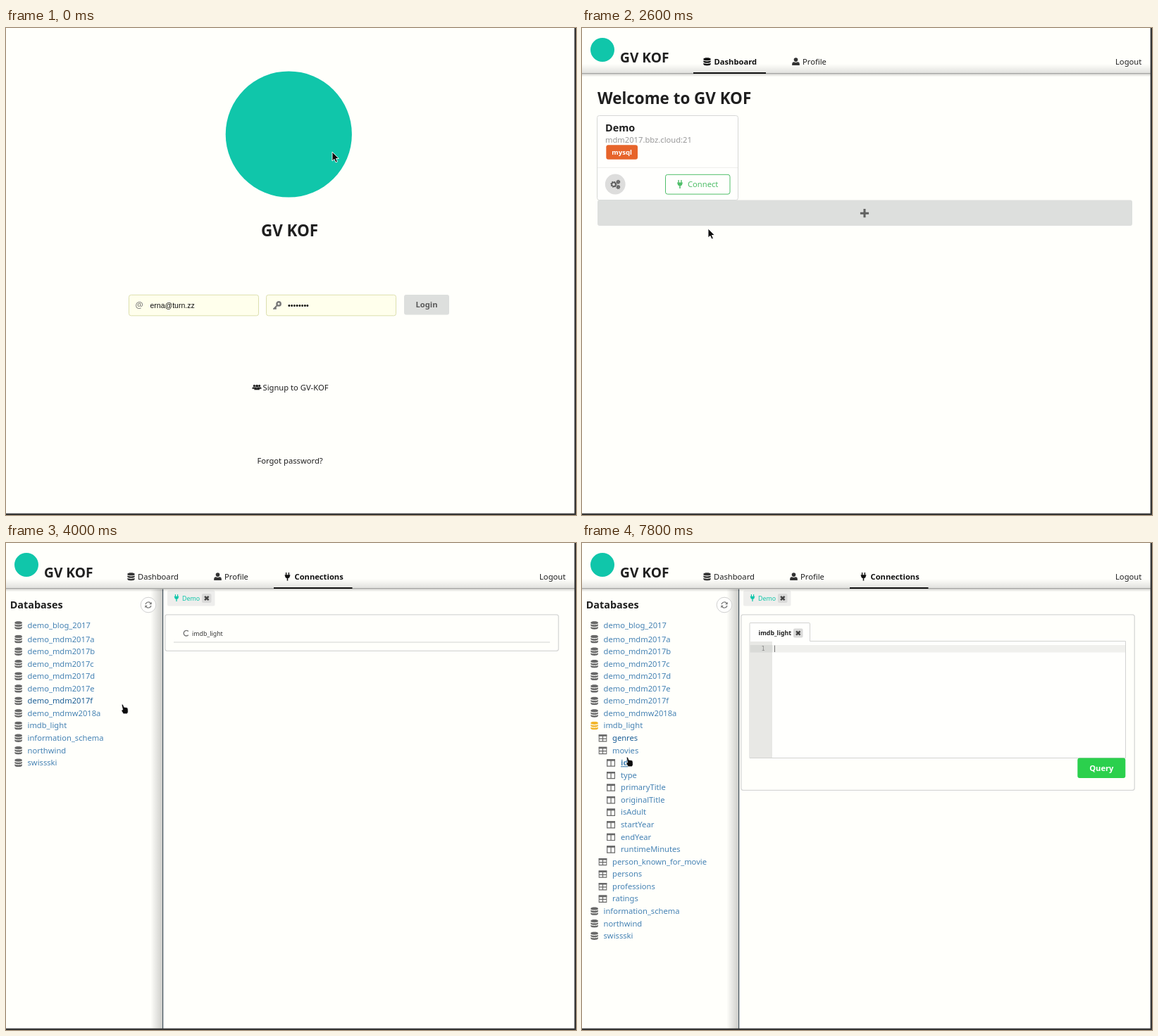
An HTML page that plays this animation: 809 by 692 pixels, repeating every 8 s.

```html
<!DOCTYPE html>
<html lang="en">
<head>
<meta charset="utf-8">
<title>Database client</title>
<style>
html, body { margin: 0; width: 100%; height: 100%; overflow: hidden; background: #fffffb; }
svg { display: block; width: 100vw; height: 100vh; }
text { font: 11.2px "Noto Sans", "Open Sans", sans-serif; fill: #1f1f1f; white-space: pre; }
.b { font-weight: 700; }
.link text { fill: #4683b4; }
.link.hover text { fill: #1c5f96; }
</style>
</head>
<body>
<svg id="stage" viewBox="0 0 809 692" xmlns="http://www.w3.org/2000/svg"></svg>
<script>
const LOOP = 8000, STEP = 100, PITCH = 17.57;
const stage = document.getElementById('stage');
const TEAL = '#10c6aa', GREY = '#dddfdd', EDGE = '#d6d7d6';

const text = (x, y, s, { size = 11.2, fill, bold, more = '' } = {}) =>
  `<text x="${x}" y="${y}" class="${bold ? 'b' : ''}" style="font-size:${size}px${fill ? ';fill:' + fill : ''}" ${more}>${s}</text>`;
const mid = 'text-anchor="middle"';
const rect = (x, y, w, h, fill, more = '') =>
  `<rect x="${x}" y="${y}" width="${w}" height="${h}" fill="${fill}" ${more}/>`;
const icon = (name, x, y, w, color) =>
  `<use href="#${name}" x="${x}" y="${y}" width="${w}" height="${w}" color="${color}"/>`;
const group = (id, body, more = '') => `<g id="${id}" ${more}>${body}</g>`;
const symbol = (id, body) => `<symbol id="${id}" viewBox="0 0 14 14">${body}</symbol>`;
const fillPath = d => `<path fill="currentColor" d="${d}"/>`;
const linePath = (d, w) => `<path fill="none" stroke="currentColor" stroke-width="${w}" d="${d}"/>`;
const person = (x, y, s) => `<g transform="translate(${x} ${y}) scale(${s})">` +
  fillPath('M7 .5a3.2 3.2 0 0 1 0 6.6a3.2 3.2 0 0 1 0-6.6ZM.8 13V11Q.8 7.8 4 7.6Q7 9 10 7.6Q13.2 7.8 13.2 11V13Z') + '</g>';

const defs = `<defs>
  ${symbol('db', fillPath('M1 2.6C1-.3 13-.3 13 2.6V3.3C13 5.9 1 5.9 1 3.3ZM1 5.2C3 7 11 7 13 5.2V7.3C13 10 1 10 1 7.3ZM1 9.3C3 11.1 11 11.1 13 9.3V11.4C13 14.3 1 14.3 1 11.4Z'))}
  ${symbol('user', person(0, 0, 1))}
  ${symbol('users', person(0, 2.6, .48) + person(7.3, 2.6, .48) + person(2.9, 2.5, .6))}
  ${symbol('plug', fillPath('M4 0H5.6V4H8.4V0H10V4H11.5V5.5H11Q11 9.2 7.9 9.7V14H6.1V9.7Q3 9.2 3 5.5H2.5V4H4Z'))}
  ${symbol('plus', fillPath('M5.3 0H8.7V5.3H14V8.7H8.7V14H5.3V8.7H0V5.3H5.3Z'))}
  ${symbol('cross', linePath('M3 3L11 11M11 3L3 11', 3.6))}
  ${symbol('key', '<circle cx="9.4" cy="4.6" r="3.1" fill="none" stroke="currentColor" stroke-width="2.8"/>' + linePath('M7 7L1.5 12.5H4.5V10.5', 2.2))}
  ${symbol('table', linePath('M.8 2H13.2V12.5H.8ZM7 3V12M1 8H13', 1.4) + fillPath('M.2 1.3H13.8V4.2H.2Z'))}
  ${symbol('column', linePath('M.8 2H13.2V12.5H.8ZM7 3V12', 1.4) + fillPath('M.2 1.3H13.8V4.2H.2Z'))}
  ${symbol('refresh', linePath('M2 6A5.2 5.2 0 0 1 11.5 4.3M12 8A5.2 5.2 0 0 1 2.5 9.7', 1.5) + fillPath('M13 1.5V6H8.5ZM1 12.5V8H5.5Z'))}
  ${symbol('gears', [[4.8, 7, 2.7], [11, 3.6, 1.4], [11, 10.6, 1.4]].map(([x, y, r]) =>
    `<circle cx="${x}" cy="${y}" r="${r}" fill="none" stroke="currentColor" stroke-width="1.7"/>
     <circle cx="${x}" cy="${y}" r="${r + 1}" fill="none" stroke="currentColor" stroke-width="1.4" stroke-dasharray="${(r + 1) * Math.PI / 8}"/>`).join(''))}
  <linearGradient id="headShade" x2="0" y2="1"><stop stop-opacity="0"/><stop offset="1" stop-opacity=".12"/></linearGradient>
  <linearGradient id="underShade" x2="0" y2="1"><stop stop-opacity=".16"/><stop offset="1" stop-opacity="0"/></linearGradient>
  <linearGradient id="sideShade"><stop stop-opacity="0"/><stop offset="1" stop-opacity=".2"/></linearGradient>
</defs>`;

const login =
  `<circle cx="401.3" cy="151" r="89.6" fill="${TEAL}"/>` +
  text(402.5, 295.5, 'GV KOF', { size: 22.4, bold: 1, more: mid }) +
  [174.5, 369.5].map(x => rect(x, 379.3, 184, 29.5, '#ffffec', 'rx="3" stroke="#dcdfae"')).join('') +
  text(183.5, 398, '@', { size: 12.5, fill: '#777' }) +
  text(204.5, 398, 'erna@turn.zz', { size: 10.5, more: 'font-family="Liberation Sans"' }).replace('style="', 'style="font-family:\'Liberation Sans\',sans-serif;fill:#111;') +
  icon('key', 379, 388, 12, '#777') +
  text(400, 398, '•'.repeat(8), { fill: '#111' }).replace('font-size:11.2px', "font:10.67px 'Liberation Sans',sans-serif") +
  rect(565, 379, 64, 28.6, GREY, 'id="loginBox" rx="3"') +
  group('loginLabel', text(597, 397, 'Login', { bold: 1, fill: '#5a5a5a', more: mid })) +
  group('loginSpin', '<circle cx="597" cy="393.3" r="6.5" fill="none" stroke="#aaa" stroke-width="2"/><path d="M590.5 393.3A6.5 6.5 0 0 1 597 386.8" fill="none" stroke="#666" stroke-width="2"/>') +
  icon('users', 349, 504, 14, '#222') + text(364.5, 515, 'Signup to GV-KOF') +
  text(403, 619, 'Forgot password?', { more: mid });

const tab = (name, x, label, bold) =>
  icon(name, x, 41.8, 12, bold ? '#111' : '#333') + text(x + (bold ? 16 : 15.5), 52, label, { bold, fill: bold ? '#111' : '' });
const underline = (x, w) => rect(x, 63, w, 2, '#111');
const header =
  rect(0, 51, 807, 13.5, 'url(#headShade)') + rect(0, 64, 807, 1.2, '#a3a4a2') +
  rect(0, 65.2, 807, 4, 'url(#underShade)') +
  `<circle cx="29" cy="31" r="17" fill="${TEAL}"/>` +
  text(54, 49, 'GV KOF', { size: 19.2, bold: 1 }) + text(757, 52, 'Logout') +
  group('navHome', tab('db', 171.5, 'Dashboard', 1) + tab('user', 297.5, 'Profile') + underline(158, 103)) +
  group('navPlain', tab('db', 171.5, 'Dashboard') + tab('user', 294.5, 'Profile')) +
  group('navConn', tab('plug', 393.5, 'Connections', 1) + underline(380, 111.5));

const card =
  rect(21.5, 124.5, 200, 120, '#fffffd', `rx="3" stroke="${EDGE}"`) +
  text(33, 147, 'Demo', { size: 14.4, bold: 1 }) +
  text(33, 163, 'mdm2017.bbz.cloud:21', { fill: '#999' }) +
  rect(34.3, 166.3, 44.7, 20.4, '#e7642b', 'rx="3"') +
  text(56.7, 180, 'mysql', { size: 9.6, bold: 1, fill: '#fff', more: mid }) +
  rect(22, 198, 199, 1, '#efefed') +
  '<circle cx="47.2" cy="222" r="14.4" fill="#dddddc"/>' + icon('gears', 40, 215, 14.5, '#5c5c5c') +
  rect(118.5, 208.3, 91.5, 27.8, '#fffffd', 'id="connectBox" rx="3"') +
  group('connectLabel', icon('plug', 133, 216, 12, 'currentColor') + text(150, 226, 'Connect', { fill: 'currentColor' }));
const home =
  text(22, 108, 'Welcome to GV KOF', { size: 22.4, bold: 1 }) + group('card', card) +
  group('add', rect(22, 124.5, 759, 36.5, GREY, 'id="addBox" rx="3"') + icon('plus', 394.7, 137, 12.6, '#606160'));

const row = (i, label, level = 0, name = 'db') => {
  const y = i ? 136.5 + PITCH * (i - 1) : 116.8;
  const x = [30.5, 43, 55][level];
  const key = label === 'id';
  return `<g class="link" data-y="${y}">` +
    icon(name, x - [19, 19.6, 20][level], y - 6, 12.2, label === 'imdb_light' ? '#f2b52b' : '#686868') +
    text(x, y + 4, label, { bold: key, more: key ? 'text-decoration="underline"' : '' }) + '</g>';
};
const schemas = ['blog_2017', 'mdm2017a', 'mdm2017b', 'mdm2017c', 'mdm2017d', 'mdm2017e', 'mdm2017f', 'mdmw2018a'].map(s => 'demo_' + s);
const tables = ['genres', 'movies', '.id', '.type', '.primaryTitle', '.originalTitle', '.isAdult', '.startYear', '.endYear', '.runtimeMinutes',
  'person_known_for_movie', 'persons', 'professions', 'ratings'];
const tail = ['information_schema', 'northwind', 'swissski'];
const list =
  schemas.map((s, i) => row(i, s)).join('') + group('opened', row(8, 'imdb_light')) +
  group('tables', tables.map((s, i) => s[0] === '.' ? row(i + 9, s.slice(1), 2, 'column') : row(i + 9, s, 1, 'table')).join('')) +
  group('tail', tail.map((s, i) => row(i + 9, s)).join(''));

const closeBox = (x, y) => rect(x, y, 13.5, 13, '#dadad9', 'rx="2"') + icon('cross', x + 2, y + 1.7, 9.6, '#444');
const editor =
  '<path d="M238 140V114.5Q238 113.5 239 113.5H322Q323.5 113.5 323.5 115V139.5H771.5V305.5H238Z" fill="#fffffd" stroke="#d2d3d2"/>' +
  text(250.5, 131, 'imdb_light', { size: 8.8, bold: 1 }) + closeBox(300, 121.5) +
  rect(238.5, 140, 31.5, 165, '#e8e8e5') + rect(238.5, 145, 31.5, 10.5, '#d9dad7') + rect(270, 145, 501, 10.5, '#f0f0ed') +
  text(254.5, 153, '1', { fill: '#888' }).replace('font-size:11.2px', "font:8.5px 'DejaVu Sans Mono',monospace") +
  rect(273, 145.5, 1, 9.5, '#777') +
  rect(703.3, 305.5, 68, 28.5, '#2bd04d', 'rx="3"') +
  text(737.3, 324, 'Query', { bold: 1, fill: '#fff', more: mid });
const workspace =
  rect(205, 65.5, 17.5, 624.5, 'url(#sideShade)') + rect(222, 65.5, 1.2, 624.5, '#43525c') +
  text(5.7, 93, 'Databases', { size: 14.4, bold: 1 }) +
  '<circle cx="202" cy="88" r="10.8" fill="#fffffd" stroke="#d0d0d0"/>' +
  group('reload', icon('refresh', 196.5, 82.5, 11, '#777')) + group('list', list) +
  group('connTab', rect(229, 67.5, 67.5, 22, '#eeeeec', 'rx="2"') + icon('plug', 237, 73, 10, TEAL) +
    text(250, 81.5, 'Demo', { size: 8.9, fill: TEAL }) + closeBox(278, 72)) +
  rect(225.8, 101.8, 558.4, 51.5, 'none', `id="panel" rx="3" stroke="${EDGE}" stroke-width="1.3"`) +
  group('waiting', rect(238, 140.5, 534, 1, '#d2d3d2') + text(264, 131.5, 'imdb_light', { size: 8.8, fill: '#333' }) +
    group('notch', '<path d="M258.8 125.6A3.8 3.8 0 1 0 258.8 130.8" fill="none" stroke="#777" stroke-width="1.4"/>')) +
  group('editor', editor);

const overlay = rect(0, 0, 807, 690, '#000', 'opacity=".85"') +
  '<circle cx="402.7" cy="335" r="11.8" fill="none" stroke="#555551" stroke-width="2.2"/>' +
  group('loader', '<path d="M393.4 327.8A11.8 11.8 0 0 1 410 325.7" fill="none" stroke="#fff" stroke-width="2.2"/>') +
  text(402.7, 367, 'Loading Databases', { fill: '#f0f0ec', more: mid });

stage.innerHTML = defs + rect(0, 0, 809, 692, '#fffffb') +
  group('login', login) + group('home', home) + group('workspace', workspace) + group('header', header) +
  group('overlay', overlay) +
  group('status', '<path d="M0 672H263Q266 672 266 675V690H0Z" fill="#2e2e2e"/>' + text(3, 684, 'Waiting for localhost...', { size: 10.2, fill: '#a0a09e' })) +
  group('pointer',
    group('arrow', '<path d="M0 0V13L3 10.4L5 15L7.4 14L5.4 9.5H9.3Z" fill="#0c0c0c" stroke="#fff" stroke-width=".9"/>') +
    group('hand', '<path d="M-.8 1Q0-.6 1.3 1L2.6 4.2L6.3 4.8Q8.4 5.4 8.2 8V11.5L6.8 13.7H1.6L-1 9.6Q-1.4 7.8 .8 8Z" fill="#0c0c0c" stroke="#fff" stroke-width=".6"/>')) +
  rect(806.7, 0, 2.3, 692, '#353535') + rect(0, 689.7, 809, 2.3, '#353535');

const el = id => document.getElementById(id);
const show = (id, on) => { el(id).style.display = on ? '' : 'none'; };
const fade = (id, v) => { el(id).style.opacity = v; show(id, v > 0); };
const spin = (id, x, y, deg) => el(id).setAttribute('transform', `rotate(${deg} ${x} ${y})`);
const links = [...document.querySelectorAll('.link')];

// time, x, y
const route = [
  [0, 463, 176], [100, 468, 198], [200, 468, 198], [400, 504, 283], [500, 504, 283], [700, 601, 394],
  [2200, 601, 394], [2300, 588, 405], [2400, 440, 382], [2500, 270, 325], [2600, 179, 285], [2900, 165, 229],
  [4300, 165, 229], [4400, 164, 237], [6100, 164, 237], [6500, 70, 380], [6800, 9, 497],
  [7600, 9, 497], [7700, 60, 279], [7800, 64, 304], [8000, 64, 304]
];

// Linear value of each column at time t
function at(keys, t) {
  const n = keys.findIndex(k => k[0] > t);
  if (n < 0) return keys[keys.length - 1].slice(1);
  if (n === 0) return keys[0].slice(1);
  const a = keys[n - 1], b = keys[n], p = (t - a[0]) / (b[0] - a[0]);
  return a.slice(1).map((v, i) => v + (b[i + 1] - v) * p);
}
const inside = (x, y, x0, y0, x1, y1) => x >= x0 && x <= x1 && y >= y0 && y <= y1;

function render(t) {
  const [x, y] = at(route, t);
  const [px, py] = at(route, Math.max(0, t - STEP)); // hover colours trail the pointer by a step
  const scene = t < 1500 ? 'login' : t < 3500 ? 'home' : 'workspace';
  ['login', 'home', 'workspace'].forEach(id => show(id, id === scene));
  show('header', scene !== 'login');
  show('navHome', scene === 'home');
  show('navPlain', scene === 'workspace');
  show('navConn', t >= 3800);

  const onLogin = scene === 'login' && inside(x, y, 565, 379, 629, 408);
  el('loginBox').setAttribute('fill', onLogin ? '#cbcdcb' : GREY);
  show('loginLabel', t < 1200);
  show('loginSpin', t >= 1200);
  spin('loginSpin', 597, 393.3, t * .6);

  show('card', t >= 1700);
  el('add').setAttribute('transform', `translate(0 ${t >= 1700 ? 120 : 0})`);
  el('addBox').setAttribute('fill', inside(x, y, 22, 245, 781, 281) ? '#cbcdcb' : GREY);
  const onConnect = scene === 'home' && inside(x, y, 118, 208, 211, 236);
  const green = onConnect ? '#24a845' : '#4fbe69';
  el('connectBox').setAttribute('stroke', green);
  el('connectBox').setAttribute('fill', t === 3200 ? '#eef6ec' : '#fffffd');
  el('connectLabel').setAttribute('color', green);

  const ready = t >= 3800, open = t >= 5300;
  show('list', ready);
  show('connTab', ready);
  show('waiting', !open);
  show('editor', open);
  show('tables', open);
  el('opened').querySelector('use').setAttribute('color', open ? '#f2b52b' : '#686868');
  el('tail').setAttribute('transform', `translate(0 ${open ? PITCH * tables.length : 0})`);
  el('panel').setAttribute('height', open ? 249.5 : 51.5);
  spin('notch', 256, 128.2, (t - 4000) * .18);
  spin('reload', 202, 88, t < 4000 ? t * .18 : 0);
  links.forEach(link => {
    const shift = link.parentNode.id === 'tail' && open ? PITCH * tables.length : 0;
    link.classList.toggle('hover', ready && px > 12 && Math.abs(py - link.dataset.y - shift) < PITCH / 2);
  });

  fade('overlay', t < 3500 ? 0 : at([[3700, 1], [4000, 0]], t)[0]);
  spin('loader', 402.7, 335, (t - 3500) * .6);
  fade('status', at([[1100, 0], [1400, 1], [1800, 1], [2100, 0]], t)[0]);

  const hand = onLogin || onConnect || (t >= 3900 && x > 12);
  show('hand', hand);
  show('arrow', !hand);
  el('pointer').setAttribute('transform', `translate(${x.toFixed(1)} ${y.toFixed(1)})`);
}

const start = performance.now();
function tick() {
  const t = Math.max(0, performance.now() - start) % LOOP;
  render(Math.floor(t / STEP) * STEP);
  requestAnimationFrame(tick);
}
tick();
</script>
</body>
</html>
```
